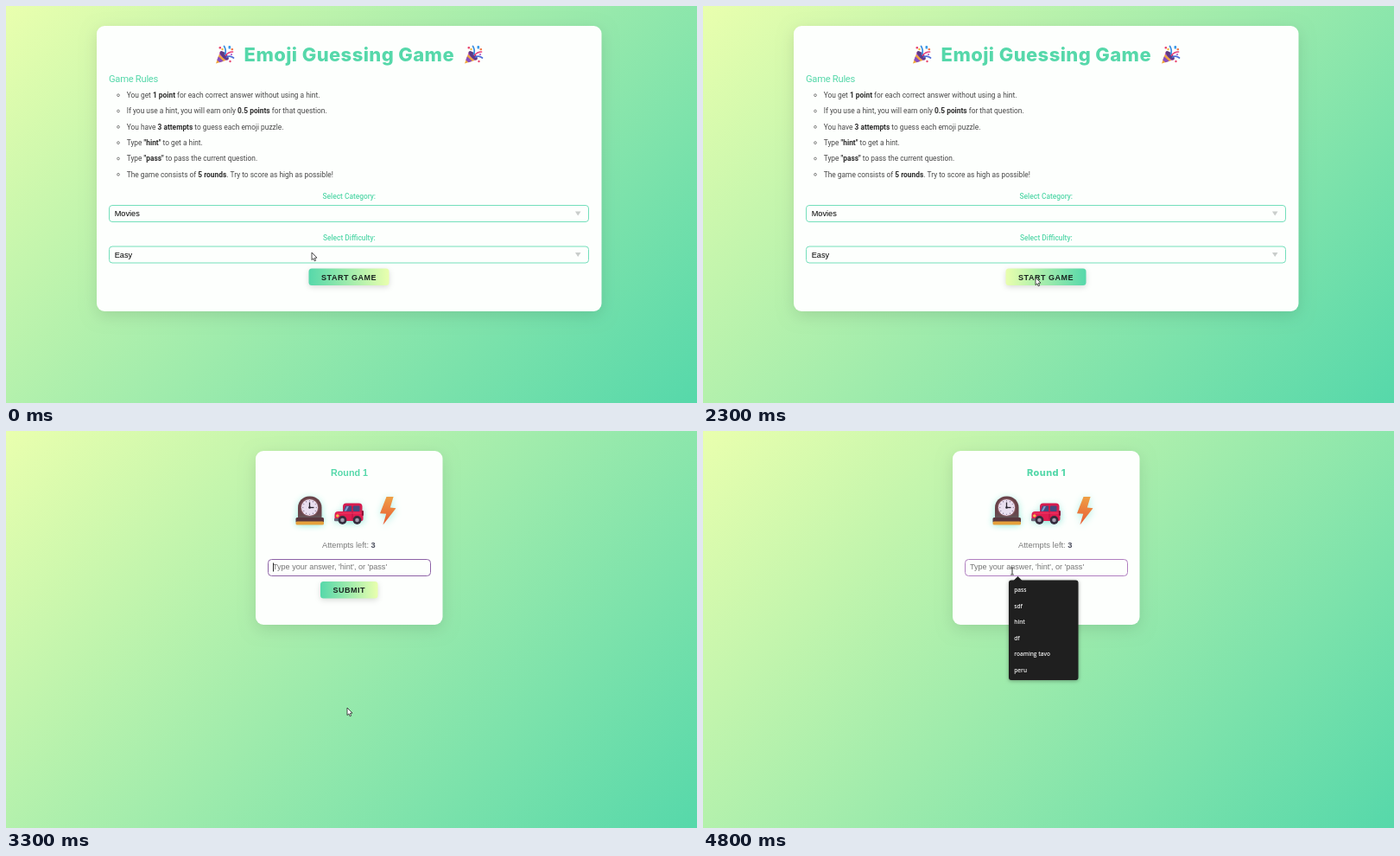
Animation, 800 px wide and 459 px high, one loop 5000 ms. Source, as an HTML page with a canvas:

```html
<!DOCTYPE html>
<html lang="en">
<head>
<meta charset="utf-8">
<title>Emoji Guessing Game</title>
<style>
html, body { margin: 0; width: 100%; height: 100%; overflow: hidden; }
canvas { display: block; width: 800px; height: 459px; }
</style>
</head>
<body>
<canvas id="stage" width="800" height="459"></canvas>
<script>
const ctx = document.getElementById('stage').getContext('2d');
const LOOP = 5000, STEP = 100, MID = 397.3;
const MINT = '#56d8aa', LIME = '#e9ffae', CARD = '#fdfffd';
const SANS = '"Liberation Sans", Arial, sans-serif';
const ROBOTO = 'Roboto, sans-serif';
const DISPLAY = 'Inter, sans-serif';

// time, x, y of the pointer tip
const POINTER = [
  [0, 354, 285], [900, 387, 320], [1600, 385, 314], [2700, 385, 314],
  [3000, 395, 321], [3300, 395, 320], [3900, 376, 239], [4400, 358, 162], [5000, 358, 162]
];
const HOVER = [1200, 2800];
const GAME_AT = 3100, FONT_AT = 3500, CARET_END = 4300, LIST_AT = 4500;

const RULES = [
  'You get *1 point* for each correct answer without using a hint.',
  'If you use a hint, you will earn only *0.5 points* for that question.',
  'You have *3 attempts* to guess each emoji puzzle.',
  'Type *"hint"* to get a hint.',
  'Type *"pass"* to pass the current question.',
  'The game consists of *5 rounds*. Try to score as high as possible!'
];
const HISTORY = ['pass', 'sdf', 'hint', 'df', 'roaming tavo', 'peru'];

function text(str, x, y, font, color, align = 'left', spacing = 0) {
  ctx.font = font;
  ctx.fillStyle = color;
  ctx.textAlign = align;
  ctx.letterSpacing = spacing + 'px';
  ctx.fillText(str, x, y);
  return ctx.measureText(str).width;
}

// parts between asterisks are bold
function richText(str, x, y, size, family, color, boldColor) {
  str.split('*').forEach((part, i) => {
    x += text(part, x, y, `${i % 2 ? 700 : 400} ${size}px ${family}`, i % 2 ? boldColor : color);
  });
}

function box(x, y, w, h, r, fill, stroke) {
  ctx.beginPath();
  ctx.roundRect(x, y, w, h, r);
  if (fill) { ctx.fillStyle = fill; ctx.fill(); }
  if (stroke) { ctx.strokeStyle = stroke; ctx.lineWidth = 1; ctx.stroke(); }
}

function poly(points, fill) {
  ctx.beginPath();
  for (let i = 0; i < points.length; i += 2) ctx.lineTo(points[i], points[i + 1]);
  ctx.closePath();
  ctx.fillStyle = fill;
  ctx.fill();
}

function disc(x, y, r, fill) {
  ctx.beginPath();
  ctx.arc(x, y, r, 0, Math.PI * 2);
  ctx.fillStyle = fill;
  ctx.fill();
}

function line(x1, y1, x2, y2, color, width) {
  ctx.beginPath();
  ctx.moveTo(x1, y1);
  ctx.lineTo(x2, y2);
  ctx.strokeStyle = color;
  ctx.lineWidth = width;
  ctx.stroke();
}

function ramp(x1, y1, x2, y2, from, to) {
  const g = ctx.createLinearGradient(x1, y1, x2, y2);
  g.addColorStop(0, from);
  g.addColorStop(1, to);
  return g;
}

function shadowed(color, blur, dy, draw) {
  ctx.save();
  ctx.shadowColor = color;
  ctx.shadowBlur = blur;
  ctx.shadowOffsetY = dy;
  draw();
  ctx.restore();
}

function card(x, w, h) {
  shadowed('rgba(0,0,0,0.11)', 18, 5, () => box(x, 23, w, h, 9, CARD));
}

function button(label, x, y, w, hover) {
  const fill = hover ? ramp(x, 0, x + w, 0, LIME, MINT) : ramp(x, 0, x + w, 0, MINT, LIME);
  shadowed('rgba(0,0,0,0.14)', 6, 2, () => box(x, y, w, 19.5, 3.5, fill));
  text(label, x + w / 2, y + 13, `700 9px ${SANS}`, '#1a2420', 'center', 0.5);
}

function select(label, value, y) {
  text(label, MID, y - 7, `500 8.4px ${ROBOTO}`, MINT, 'center');
  box(119.5, y + 0.5, 555, 19, 3.5, CARD, '#74dfbb');
  text(value, 125.7, y + 13.4, `9.2px ${SANS}`, '#000');
  poly([659, y + 7.5, 665.5, y + 7.5, 662.2, y + 12.5], '#c9cdcb');
}

function popper(x, y) {
  ctx.save();
  ctx.translate(x, y);
  poly([0.5, 21.5, 5.5, 7.5, 15, 17], '#f0a63c');
  poly([1.8, 17.6, 3.4, 13.2, 9.2, 18.8, 5, 20.2], '#8a4fc0');
  poly([4.3, 10.8, 5.5, 7.5, 15, 17, 12, 18], '#b05ad0');
  ctx.save();
  ctx.translate(10.3, 12.2);
  ctx.rotate(Math.PI / 4);
  ctx.scale(1, 0.42);
  disc(0, 0, 6.6, '#5d3a86');
  ctx.restore();
  ctx.lineCap = 'round';
  [['#3b8ee0', 11, 11, 13, 6, 10, 1.5], ['#e8417a', 12, 12, 15, 8, 20, 8],
   ['#4f6fd8', 13, 14, 17, 12, 21, 15]].forEach(([c, x1, y1, cx, cy, x2, y2]) => {
    ctx.beginPath();
    ctx.moveTo(x1, y1);
    ctx.quadraticCurveTo(cx, cy, x2, y2);
    ctx.strokeStyle = c;
    ctx.lineWidth = 1.7;
    ctx.stroke();
  });
  box(15, 1, 2.6, 3.6, 0.8, '#3c9be8');
  box(4, 2, 2.6, 2.6, 1, '#e9466f');
  box(18, 4, 2.6, 2.2, 0.8, '#f07a4a');
  disc(8, 5, 1.2, '#f4b63e');
  disc(18.5, 11, 1.1, '#b05ad0');
  disc(17, 19, 1.2, '#e9466f');
  ctx.restore();
}

function clock() {
  shadowed('rgba(60,215,190,0.5)', 8, 2, () => {
    box(338, 75.5, 27.5, 29, [13, 13, 0, 0], '#684249');
    box(335.5, 100, 32.5, 6, 1.5, '#59383f');
  });
  box(335.5, 104.5, 32.5, 4, 1.5, '#e6a13c');
  disc(351.5, 88.5, 10.6, '#8b5f66');
  disc(351.5, 88.5, 9.6, '#eadff0');
  for (let i = 0; i < 12; i++) {
    const a = i * Math.PI / 6;
    disc(351.5 + Math.sin(a) * 7.8, 88.5 - Math.cos(a) * 7.8, 0.65, '#8d7d9b');
  }
  line(351.5, 89, 351.5, 82.5, '#2b2530', 1.3);
  line(351, 88.5, 356.5, 88.5, '#2b2530', 1.3);
  disc(351.5, 88.5, 1.3, '#2b2530');
}

function car() {
  shadowed('rgba(60,215,190,0.45)', 8, 2, () => {
    box(390, 83.5, 22.5, 18, [4, 4, 2, 2], '#d71a4e');
    box(380.5, 93, 33, 11, [4, 3, 2, 2], '#e01d50');
  });
  poly([393, 86.5, 400, 86.5, 400, 93, 390.5, 93], '#454a80');
  box(402, 86.5, 7.5, 6.5, 1, '#454a80');
  poly([394.5, 87, 397, 87, 394, 92.5, 391.8, 92.5], '#7e9bcf');
  line(401, 87, 401, 102, '#a9123f', 0.8);
  line(383, 95, 412, 95, '#f3426d', 0.8);
  disc(383.8, 98, 1.8, '#f7c04d');
  box(380, 101, 7, 3.2, 1, '#6a6577');
  for (const x of [389.5, 406.5]) {
    disc(x, 103, 4.9, '#352c3d');
    disc(x, 103, 2.3, '#a49db0');
  }
  box(411.8, 92, 2.2, 6, 1, '#8d1439');
}

function bolt() {
  shadowed('rgba(60,215,190,0.4)', 8, 2, () =>
    poly([440.5, 76, 448.6, 76, 444.8, 88.5, 451.5, 89.2, 436.5, 108.5, 440.2, 95.8, 433, 95.2],
      ramp(444, 76, 440, 108, '#efa046', '#e85a32')));
}

function menu(t) {
  card(105, 584.5, 330);
  popper(242.5, 45);
  popper(530.5, 45);
  text('Emoji Guessing Game', MID, 64, `800 22px ${DISPLAY}`, MINT, 'center', 0.4);
  text('Game Rules', 119, 88.3, `400 11.2px ${ROBOTO}`, MINT, 'left', -0.27);
  RULES.forEach((rule, i) => {
    const y = 103 + i * 18.32;
    ctx.beginPath();
    ctx.arc(130, y + 0.2, 1.4, 0, Math.PI * 2);
    ctx.strokeStyle = '#555';
    ctx.lineWidth = 0.7;
    ctx.stroke();
    richText(rule, 139.7, y + 3, 8.4, ROBOTO, '#484848', '#2c2c2c');
  });
  select('Select Category:', 'Movies', 230);
  select('Select Difficulty:', 'Easy', 277.5);
  button('START GAME', 350.5, 303.5, 93, t >= HOVER[0] && t < HOVER[1]);
}

function round(t) {
  const ready = t >= FONT_AT;
  card(289, 216.5, 201);
  if (ready) text('Round 1', MID + 0.2, 52, `800 11px ${DISPLAY}`, MINT, 'center', 0.4);
  else text('Round 1', MID + 0.2, 52, `700 10.75px ${SANS}`, MINT, 'center');
  clock();
  car();
  bolt();
  richText('Attempts left: *3*', ready ? 365 : 366, 134.6, ready ? 9.4 : 9.25, SANS, '#7b7b7b', '#4a4d5c');
  box(303.5, 148.5, 188, 19, 4, CARD, ready ? '#b07fc0' : '#8d62a6');
  text("Type your answer, 'hint', or 'pass'", 309, 160.3, `9.05px ${SANS}`, '#757575');
  if (t < CARET_END) line(309.5, 152.5, 309.5, 162.5, '#222', 1);
  button('SUBMIT', 364, 174, 66.5, false);
  if (t >= LIST_AT) history();
}

function history() {
  shadowed('rgba(0,0,0,0.35)', 4, 1, () => box(354, 172.5, 80.5, 115.5, 3, '#1f1f1f'));
  poly([359.5, 173, 364.5, 168, 369.5, 173], '#1f1f1f');
  HISTORY.forEach((word, i) =>
    text(word, 360.3, 186.3 + i * 18.5, '600 6.5px "Open Sans", sans-serif', '#f0f0f0'));
}

function pointer(t) {
  const i = POINTER.findIndex(k => k[0] > t);
  const [t0, x0, y0] = POINTER[i - 1], [t1, x1, y1] = POINTER[i];
  const p = (t - t0) / (t1 - t0);
  const x = x0 + (x1 - x0) * p, y = y0 + (y1 - y0) * p;
  ctx.save();
  ctx.translate(x, y);
  if (t >= GAME_AT && y < 167) {
    line(0, -4, 0, 4, '#333', 1);
    line(-2, -4, 2, -4, '#333', 0.8);
    line(-2, 4, 2, 4, '#333', 0.8);
  } else {
    poly([0, 0, 0, 8.6, 1.9, 6.9, 3.2, 9.8, 4.6, 9.2, 3.4, 6.3, 6, 6.1], '#fff');
    ctx.strokeStyle = '#222';
    ctx.lineWidth = 0.8;
    ctx.stroke();
  }
  ctx.restore();
}

function draw(now) {
  const t = Math.floor((now % LOOP) / STEP) * STEP;
  ctx.fillStyle = ramp(85.25, -85.25, 714.75, 544.25, LIME, MINT);
  ctx.fillRect(0, 0, 800, 459);
  if (t < GAME_AT) menu(t);
  else round(t);
  pointer(t);
}

const start = performance.now();
function tick() {
  draw(performance.now() - start);
  requestAnimationFrame(tick);
}
tick();
</script>
</body>
</html>
```
